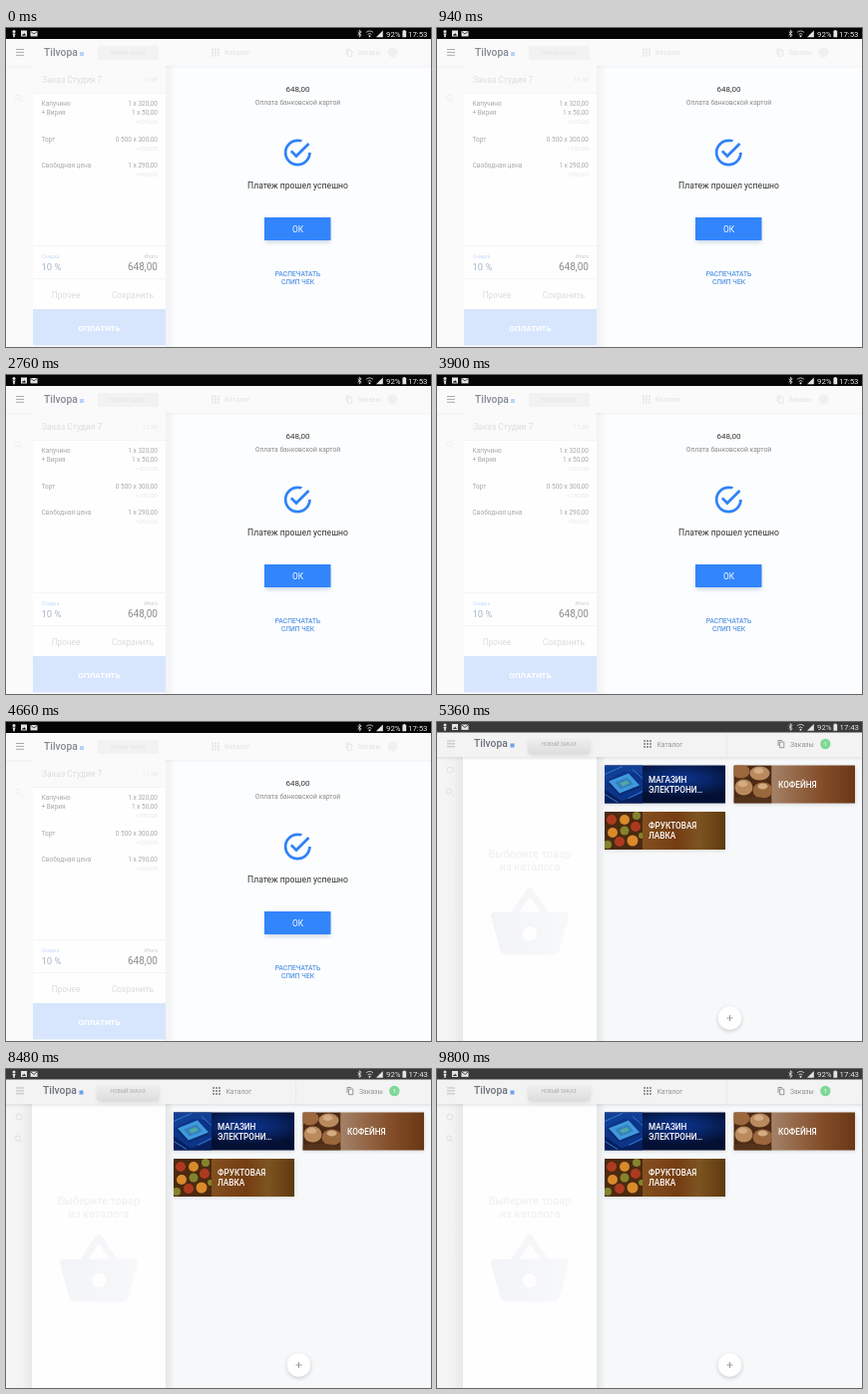
These frames come from a looping animation (426 px wide and 320 px high, 9.82 s). An HTML page:

```html
<!DOCTYPE html>
<html lang="ru">
<head>
<meta charset="utf-8">
<title>Касса</title>
<style>
  html, body { margin: 0; width: 100%; height: 100%; overflow: hidden; background: #fcfdfe; }
  svg { display: block; width: 100vw; height: 100vh; }
  text { font-family: Roboto, "Open Sans", sans-serif; }
  .mid { text-anchor: middle; }
  .end { text-anchor: end; }
  .status { font-size: 7.8px; fill: #e8e8e8; }
  .brand { font-size: 10.3px; font-weight: 500; }
  .row { font-size: 6.5px; fill: #a9a9a9; }
  .faint { font-size: 6.2px; fill: #e6e6e6; }
  .tab { font-size: 6.8px; }
  .tile { font-size: 8.2px; font-weight: 500; fill: #fff; }
  .catalog { animation: swap 9820ms linear infinite; }
  @keyframes swap {
    0%, 50.9% { opacity: 0; }
    52.7%, 100% { opacity: 1; }
  }
</style>
</head>
<body>
<svg viewBox="0 0 426 320">
  <defs>
    <filter id="soft" x="-30%" y="-30%" width="160%" height="160%"><feGaussianBlur stdDeviation="2"/></filter>
    <filter id="blur"><feGaussianBlur stdDeviation=".6"/></filter>
    <linearGradient id="edge"><stop stop-color="#000" stop-opacity=".08"/><stop offset="1" stop-color="#000" stop-opacity="0"/></linearGradient>
    <linearGradient id="drop" x2="0" y2="1"><stop stop-color="#000" stop-opacity=".08"/><stop offset="1" stop-color="#000" stop-opacity="0"/></linearGradient>
    <linearGradient id="rail"><stop stop-color="#f6f6f6"/><stop offset=".6" stop-color="#f3f3f3"/><stop offset="1" stop-color="#e8e8e8"/></linearGradient>
    <linearGradient id="btn" x2="0" y2="1"><stop stop-color="#eeeeee"/><stop offset="1" stop-color="#dedede"/></linearGradient>
    <linearGradient id="basket"><stop stop-color="#f3f4f7"/><stop offset="1" stop-color="#f7f8fa"/></linearGradient>
    <radialGradient id="blue" cx=".62" cy=".35" r=".5"><stop stop-color="#0c3390"/><stop offset=".5" stop-color="#082566"/><stop offset="1" stop-color="#041033"/></radialGradient>
    <linearGradient id="brown"><stop offset=".3" stop-color="#a5846a"/><stop offset=".5" stop-color="#95694a"/><stop offset=".75" stop-color="#814b26"/><stop offset="1" stop-color="#693817"/></linearGradient>
    <linearGradient id="rust"><stop offset=".3" stop-color="#84511f"/><stop offset=".6" stop-color="#753d13"/><stop offset=".78" stop-color="#7d5420"/><stop offset="1" stop-color="#5f3a10"/></linearGradient>
    <clipPath id="thumb"><rect width="38" height="38"/></clipPath>

    <g id="icons">
      <g fill="#e4e4e4">
        <circle cx="8" cy="3.6" r="1.5"/><path d="M6.4 5.4h3.2l-.8 2.4v1.4H7.2V7.8z"/>
        <path d="M15 2.6h6v6h-6zM16 7.5h4L18.6 5.2l-1 1.2-.6-.6z" fill-rule="evenodd"/>
        <rect x="24.5" y="3" width="7" height="5.4"/>
        <circle cx="364.5" cy="8.3" r="1"/>
        <path d="M371 9.2h6.8V2.4z"/>
        <path d="M397.4 2.8h1.1V2h1.6v.8h1.1v6.5h-3.8z"/>
      </g>
      <path d="M24.5 3.2 28 6l3.5-2.8" fill="none" stroke="#222" stroke-width=".8"/>
      <path d="m352.6 4 3.6 3.2-1.9 1.8V2.2l1.9 1.7-3.6 3.3M361 4.4a5 5 0 0 1 7 0M362.6 6.4a2.8 2.8 0 0 1 3.8 0" fill="none" stroke="#e4e4e4" stroke-width=".8"/>
      <text class="status" x="381" y="8.6">92%</text>
    </g>
    <path id="menu" d="M10 21.5h8M10 24.4h8M10 27.3h8" fill="none"/>
    <path id="grid" d="M0 0h2v2H0zM3 0h2v2H3zM6 0h2v2H6zM0 3h2v2H0zM3 3h2v2H3zM6 3h2v2H6zM0 6h2v2H0zM3 6h2v2H3zM6 6h2v2H6z"/>
    <path id="copy" d="M0 5.5V0h4M1.6 1.6h4.2v5.6H1.6z" fill="none" stroke-width=".9"/>
    <g id="search" fill="none"><circle cx="12" cy="69.5" r="2.5"/><path d="m14 71.5 2.6 2.6"/></g>
  </defs>

  <!-- payment screen -->
  <g>
    <rect width="426" height="320" fill="#fcfdfe"/>
    <rect y="11" width="426" height="27" fill="#fafafb"/>
    <rect y="38" width="27" height="282" fill="#fafafa"/>
    <rect y="38" width="426" height="3" fill="url(#drop)" opacity=".5"/>
    <rect width="426" height="11" fill="#050505"/>
    <use href="#icons"/>
    <text class="status" x="403" y="8.6">17:53</text>
    <use href="#menu" stroke="#aaa"/>
    <text class="brand" x="38" y="27.5" fill="#858a92">Tilvopa</text>
    <rect x="74" y="24" width="4" height="4" fill="#b9d3fa"/>
    <rect x="92" y="18" width="61" height="14" rx="1" fill="#f2f2f3"/>
    <text class="mid" x="122" y="26.8" font-size="5" fill="#e2e2e2">НОВЫЙ ЗАКАЗ</text>
    <use href="#grid" x="206" y="20.5" fill="#e6e6e6"/>
    <text class="tab" x="219" y="27" fill="#e2e2e2">Каталог</text>
    <use href="#copy" x="341" y="21" stroke="#e6e6e6"/>
    <text class="tab" x="352" y="27" fill="#e2e2e2">Заказы</text>
    <circle cx="387.5" cy="24.5" r="5" fill="#eff1f0"/>
    <use href="#search" stroke="#f0f0f0"/>

    <rect x="160" y="38" width="10" height="282" fill="url(#edge)" opacity=".55"/>
    <rect x="27" y="38" width="133" height="282" fill="#fefefe"/>
    <rect x="27" y="38" width="133" height="27" fill="#fafafa"/>
    <path d="M27 65.5h133M27 218.5h133M27 251.5h133" stroke="#f4f4f4"/>
    <text x="36" y="54.5" font-size="8.5" fill="#dddddd">Заказ Студия 7</text>
    <text class="faint end" x="152" y="54">17:38</text>
    <g class="row">
      <text x="35.5" y="78">Капучино</text>
      <text x="35.5" y="87">+ Вирия</text>
      <text x="35.5" y="113.5">Торт</text>
      <text x="35.5" y="140">Свободная цена</text>
      <g class="end">
        <text x="152" y="78">1 x 320,00</text>
        <text x="152" y="87">1 x 50,00</text>
        <text x="152" y="113.5">0 500 x 300,00</text>
        <text x="152" y="140">1 x 290,00</text>
      </g>
    </g>
    <g class="faint end">
      <text x="152" y="96">=370,00</text>
      <text x="152" y="122.5">=150,00</text>
      <text x="152" y="149">=290,00</text>
    </g>
    <text x="36" y="231" font-size="5" fill="#c5dbf8">Скидка</text>
    <text x="35.5" y="242.5" font-size="9.5" fill="#a9b6c8">10 %</text>
    <text class="end" x="152" y="231" font-size="5" fill="#c8c8c8">Итого</text>
    <text class="end" x="152" y="242.8" font-size="10" fill="#8c8c8c">648,00</text>
    <text class="mid" x="60" y="270.5" font-size="8.3" fill="#dcdcdc">Прочее</text>
    <text class="mid" x="127" y="270.5" font-size="8.5" fill="#dcdcdc">Сохранить</text>
    <rect x="27" y="282" width="133" height="36.5" fill="#d7e6fd"/>
    <text class="mid" x="93.5" y="303.5" font-size="8" font-weight="700" fill="#fff">ОПЛАТИТЬ</text>

    <text class="mid" x="292.5" y="63.8" font-size="8" fill="#333">648,00</text>
    <text class="mid" x="292.5" y="76.8" font-size="6.75" fill="#8b8b8b">Оплата банковской картой</text>
    <path transform="translate(276.1 108.8) scale(1.35)" fill="#2f82f8" d="M7.91 10.08 6.5 11.5 11 16 21 6l-1.41-1.42L11 13.17zM20 12c0 4.42-3.58 8-8 8s-8-3.58-8-8 3.58-8 8-8c.76 0 1.5.11 2.2.31l1.57-1.57C14.61 2.26 13.34 2 12 2 6.48 2 2 6.48 2 12s4.48 10 10 10 10-4.48 10-10z"/>
    <text class="mid" x="292.5" y="160.6" font-size="8.6" fill="#333">Платеж прошел успешно</text>
    <rect x="260" y="193" width="65" height="22" fill="#6a87b5" opacity=".35" filter="url(#soft)"/>
    <rect x="259" y="190" width="66.5" height="23" fill="#3285fb"/>
    <text class="mid" x="292.5" y="204.6" font-size="8.3" fill="#fff">ОК</text>
    <g class="mid" font-size="6.7" fill="#2f7de0">
      <text x="292.5" y="249">РАСПЕЧАТАТЬ</text>
      <text x="292.5" y="257">СЛИП ЧЕК</text>
    </g>
  </g>

  <!-- catalogue screen -->
  <g class="catalog">
    <rect width="426" height="320" fill="#f6f8fa"/>
    <rect y="35" width="26" height="285" fill="url(#rail)"/>
    <rect x="26" y="35" width="134" height="285" fill="#fefefe"/>
    <rect x="160" y="35" width="9" height="285" fill="url(#edge)"/>
    <rect y="11" width="426" height="24" fill="#f3f3f3"/>
    <path d="M290.5 12v22" stroke="#e9e9e9"/>
    <rect y="35" width="426" height="4" fill="url(#drop)"/>
    <rect width="426" height="10.5" fill="#393939"/>
    <use href="#icons" y="-.5"/>
    <text class="status" x="403.5" y="8.1">17:43</text>
    <use href="#menu" y="-2.5" stroke="#bbb"/>
    <text class="brand" x="37" y="25" fill="#6d737b">Tilvopa</text>
    <rect x="73.5" y="21.5" width="4" height="4" fill="#6ba3ee"/>
    <rect x="92" y="19" width="61" height="14" fill="#000" opacity=".12" filter="url(#soft)"/>
    <rect x="91" y="17" width="62" height="14" rx="1" fill="url(#btn)"/>
    <text class="mid" x="122" y="24.3" font-size="5" fill="#a6a6a6">НОВЫЙ ЗАКАЗ</text>
    <use href="#grid" x="207" y="18" fill="#999"/>
    <text class="tab" x="220.5" y="24.5" fill="#929292">Каталог</text>
    <use href="#copy" x="342" y="18.5" stroke="#8e8e8e"/>
    <text class="tab" x="354" y="24.5" fill="#929292">Заказы</text>
    <circle cx="389.3" cy="22" r="5.2" fill="#7dd897"/>
    <text class="mid" x="389.3" y="24.2" font-size="6" fill="#fff">1</text>
    <g fill="none" stroke="#e0e0e0">
      <circle cx="13" cy="48" r="3"/>
      <use href="#search"/>
    </g>

    <g class="mid" font-size="11" fill="#eeeff1">
      <text x="93" y="135.5">Выберите товар</text>
      <text x="93" y="149">из каталога</text>
    </g>
    <path transform="translate(50.4 158.9) scale(3.55)" fill="url(#basket)" fill-rule="evenodd" d="M17.21 9l-4.38-6.56c-.19-.28-.51-.42-.83-.42s-.64.14-.83.43L6.79 9H2c-.55 0-1 .45-1 1 0 .09.01.18.04.27l2.54 9.27c.23.84 1 1.46 1.92 1.46h13c.92 0 1.69-.62 1.93-1.46l2.54-9.27L23 10c0-.55-.45-1-1-1zM9 9l3-4.4L15 9zm3 8a2 2 0 1 1 0-4 2 2 0 0 1 0 4z"/>

    <g fill="#000" opacity=".16" filter="url(#soft)">
      <rect x="168" y="45" width="121" height="37"/>
      <rect x="298" y="45" width="121" height="37"/>
      <rect x="168" y="91.5" width="121" height="37"/>
    </g>
    <rect x="168" y="43.5" width="121" height="38" fill="url(#blue)"/>
    <rect x="297.5" y="43.5" width="121.5" height="38" fill="url(#brown)"/>
    <rect x="168" y="90" width="121" height="38" fill="url(#rust)"/>

    <g transform="translate(168 43.5)" clip-path="url(#thumb)">
      <rect width="38" height="38" fill="#0c3488"/>
      <g filter="url(#blur)">
        <path d="M0 0h38v9L20 6 0 16z" fill="#123f96"/>
        <path d="M0 24 17 36 38 28v10H0z" fill="#071f5c"/>
        <path d="M3 18 24 9l12 13-21 8z" fill="#0a2a70"/>
        <path d="M4 16 24 8l11 12-20 8z" fill="#3f9ade"/>
        <path d="m10 17 13-5 6 7-13 5z" fill="#3780bd"/>
        <path d="m15 18 7-3 3 3-7 3z" fill="#4fa9a4"/>
        <path d="M0 9 18 1M0 29l13 8M28 4l10 9M24 33l14-7" stroke="#2f7ad0"/>
      </g>
    </g>
    <g transform="translate(297.5 43.5)" clip-path="url(#thumb)">
      <rect width="38" height="38" fill="#4c2a15"/>
      <g filter="url(#blur)">
        <g fill="#9b673c"><ellipse cx="7" cy="6" rx="9" ry="7"/><ellipse cx="29" cy="25" rx="10" ry="8"/></g>
        <g fill="#b98a5e"><ellipse cx="26" cy="8" rx="10" ry="7"/><ellipse cx="10" cy="22" rx="9" ry="8"/></g>
        <g fill="#d3ac83"><ellipse cx="25" cy="5.5" rx="5" ry="3"/><ellipse cx="9" cy="18.5" rx="5" ry="3"/><ellipse cx="29" cy="21" rx="5" ry="3"/></g>
        <path d="M0 33q18-4 38 1v4H0z" fill="#55331b"/>
      </g>
    </g>
    <g transform="translate(168 90)" clip-path="url(#thumb)">
      <rect width="38" height="38" fill="#4b2a10"/>
      <g filter="url(#blur)">
        <g fill="#ad3a1f"><circle cx="7" cy="8" r="5"/><circle cx="31" cy="15" r="5"/><circle cx="15" cy="30" r="5"/></g>
        <g fill="#d98a2b"><circle cx="20" cy="8" r="5"/><circle cx="8" cy="21" r="5"/><circle cx="28" cy="29" r="5.5"/></g>
        <g fill="#84832d"><circle cx="32" cy="4" r="4"/><circle cx="20" cy="19" r="4.5"/><circle cx="3" cy="33" r="4"/><circle cx="37" cy="24" r="3"/></g>
      </g>
    </g>
    <g class="tile">
      <text x="212" y="61">МАГАЗИН</text>
      <text x="212" y="70.8">ЭЛЕКТРОНИ…</text>
      <text x="342" y="66">КОФЕЙНЯ</text>
      <text x="212" y="107.3">ФРУКТОВАЯ</text>
      <text x="212" y="117">ЛАВКА</text>
    </g>

    <circle cx="293.5" cy="298.5" r="11.8" fill="#000" opacity=".18" filter="url(#soft)"/>
    <circle cx="293.5" cy="297" r="11.8" fill="#fff"/>
    <path d="M290.5 297h6M293.5 294v6" stroke="#999"/>
  </g>
</svg>
</body>
</html>
```
